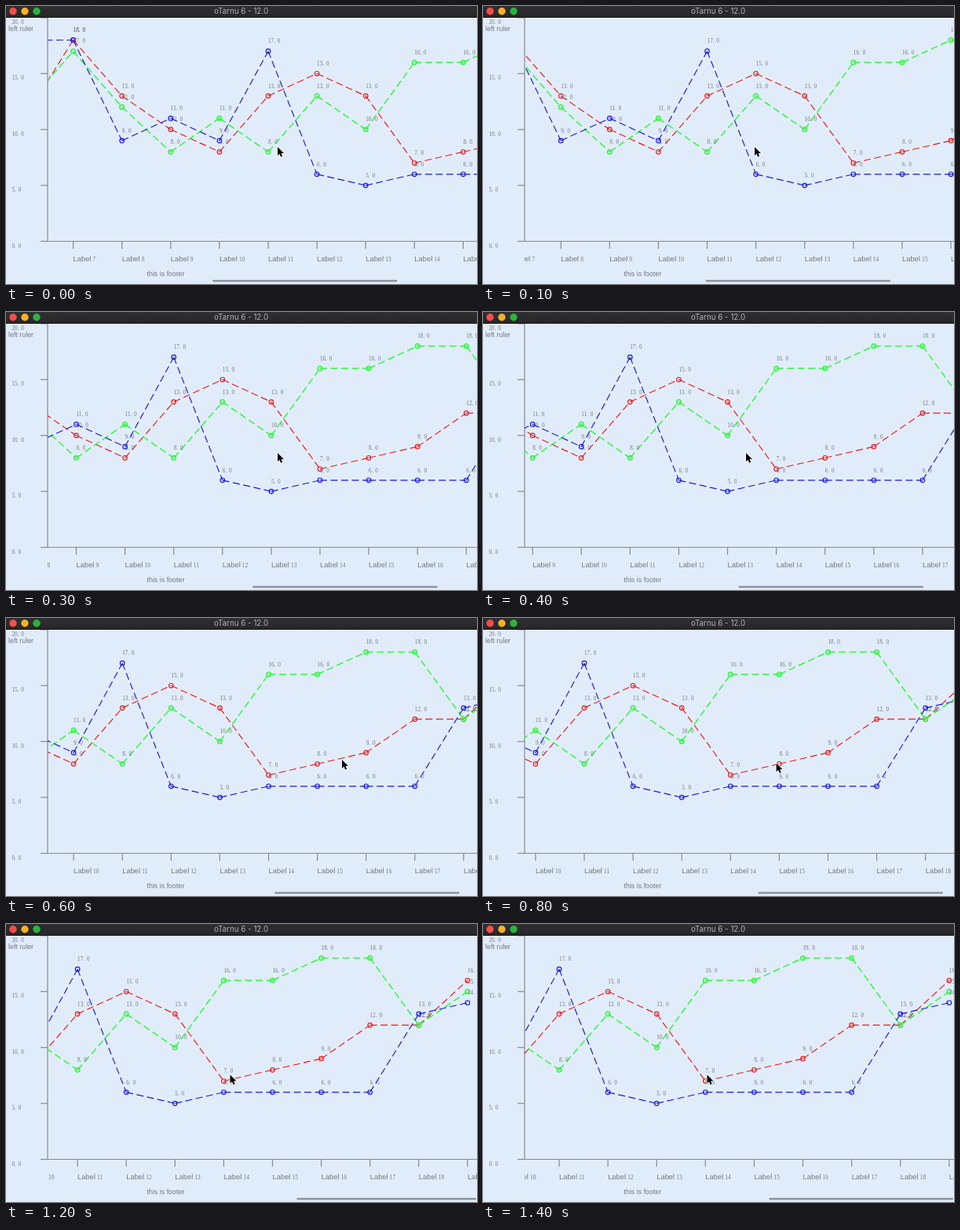
These frames come from a looping animation (600x355 px, 1500 ms). An HTML page with a canvas:

```html
<!DOCTYPE html>
<html lang="en">
<head>
<meta charset="utf-8">
<title>Line chart</title>
<style>
  html, body { margin: 0; width: 100%; height: 100%; overflow: hidden; background: #e1ecfa; }
  canvas { display: block; }
</style>
</head>
<body>
<canvas id="stage" width="600" height="355"></canvas>
<script>
const ctx = document.getElementById('stage').getContext('2d');
const SANS = '"Liberation Sans", Arial, sans-serif';
const SERIF = '"Liberation Serif", Times, serif';
const INK = '#74797f', RULE = '#858a91';
const LEFT = 53, TOP = 15, BASE = 300.5, UNIT = 14.28, STEP = 62.1;
const FIRST = 6, LAST = 19, REST = 98;
const arrow = new Path2D('M0 0V11L2.5 8.7 4.2 12.7 6.2 11.8 4.5 7.9H8Z');

// Plotted values, one per label from FIRST to LAST
const series = [
  { color: '#e8181c', width: 1.15, values: [11, 18, 13, 10, 8, 13, 15, 13, 7, 8, 9, 12, 12, 16] },
  { color: '#35f545', width: 1.5, values: [12, 17, 12, 8, 11, 8, 13, 10, 16, 16, 18, 18, 12, 15] },
  { color: '#1818dc', width: 1.15, values: [18, 18, 9, 11, 9, 17, 6, 5, 6, 6, 6, 6, 13, 14] }
];

const yOf = value => BASE - UNIT * value;

// x of "Label 11": coasting, then a drag past the end, then the bounce back
function scrollAt(tick) {
  if (tick < 8) return 70 + 264 * Math.pow(2 / 3, tick / 2);
  if (tick <= 10) return 129 - 27.5 * (tick - 8);
  const s = 1.25 * (tick - 10);
  return REST - 24 * (1 + s) * Math.exp(-s);
}

// Rests, moves right to the grab point, then drags left
function pointerAt(tick) {
  if (tick < 4) return [346, 180];
  if (tick < 6) return [335 + 46 * (tick - 4), 180];
  const drag = Math.min(1, (tick - 6) / 4.8) ** 1.1;
  return [428 - 142.5 * drag, 181 + 11.5 * drag];
}

function text(str, x, y, size, family = SANS, color = INK) {
  ctx.font = `${size}px ${family}`;
  ctx.fillStyle = color;
  ctx.fillText(str, x, y);
}

function number(value, x, y) {
  ctx.wordSpacing = '1px';
  text(value + '. 0', x, y, 7.2, SERIF);
  ctx.wordSpacing = '0px';
}

function line(x0, y0, x1, y1, color, width) {
  ctx.strokeStyle = color;
  ctx.lineWidth = width;
  ctx.beginPath();
  ctx.moveTo(x0, y0);
  ctx.lineTo(x1, y1);
  ctx.stroke();
}

function circle(x, y, r) {
  ctx.beginPath();
  ctx.arc(x, y, r, 0, Math.PI * 2);
}

function drawAxes() {
  line(LEFT, TOP, LEFT, BASE, RULE, 1.2);
  line(LEFT, BASE, 600, BASE, RULE, 1.2);
  for (let v = 0; v <= 20; v += 5) {
    line(44, yOf(v), LEFT, yOf(v), RULE, 1.2);
    number(v, 7.5, yOf(v) + 8);
  }
  text('left ruler', 3, 31.5, 8.9);
  text('this is footer', 179.5, 345, 8.9);
}

function drawSeries({ color, width, values }, xOf) {
  // Each segment starts its own dash pattern
  ctx.setLineDash([9, 4.5]);
  for (let i = 1; i < values.length; i++) {
    line(xOf(i - 1), yOf(values[i - 1]), xOf(i), yOf(values[i]), color, width);
  }
  ctx.setLineDash([]);
  values.forEach((v, i) => {
    circle(xOf(i), yOf(v), 2.8);
    ctx.stroke();
    number(v, xOf(i), yOf(v) - 10.3);
  });
}

function drawPlot(scroll) {
  const xOf = i => scroll + (i + FIRST - 11) * STEP;
  ctx.save();
  ctx.beginPath();
  ctx.rect(LEFT, TOP, 600 - LEFT, 340);
  ctx.clip();
  for (let i = 0; i <= LAST - FIRST; i++) {
    line(xOf(i), BASE, xOf(i), BASE + 9.5, RULE, 1.2);
    text('Label', xOf(i), 326.3, 9.4);
    text(i + FIRST, xOf(i) + 25, 326.3, 7.5, SERIF);
  }
  series.forEach(s => drawSeries(s, xOf));
  ctx.restore();
}

function drawScrollbar(scroll) {
  const over = Math.max(0, REST - scroll);
  const start = 263 + 0.426 * (333.9 - Math.max(scroll, REST)) + over;
  ctx.fillStyle = '#8d939c';
  ctx.beginPath();
  ctx.roundRect(start, 349.8, 235.5 - over, 2.5, 1.25);
  ctx.fill();
}

function drawTitleBar() {
  const shade = ctx.createLinearGradient(0, 0, 0, TOP);
  shade.addColorStop(0, '#303033');
  shade.addColorStop(1, '#262629');
  ctx.fillStyle = shade;
  ctx.fillRect(0, 0, 600, TOP);
  ctx.fillStyle = '#151517';
  ctx.fillRect(0, TOP - 1, 600, 1);
  ['#fb4c46', '#f9b126', '#2bb53c'].forEach((color, i) => {
    ctx.fillStyle = color;
    circle(9 + 15 * i, 6.8, 4.7);
    ctx.fill();
  });
  ctx.textAlign = 'center';
  text('oTarnu 6 - 12.0', 299.5, 10.4, 9.8, 'Inter, sans-serif', '#b2b2b4');
  ctx.textAlign = 'left';
}

function drawPointer(x, y) {
  ctx.save();
  ctx.translate(x, y);
  ctx.strokeStyle = '#fff';
  ctx.lineWidth = 1.4;
  ctx.stroke(arrow);
  ctx.fillStyle = '#000';
  ctx.fill(arrow);
  ctx.restore();
}

function draw() {
  const tick = Math.floor(performance.now() % 1500 / 100);
  const scroll = scrollAt(tick);
  ctx.fillStyle = '#e1ecfa';
  ctx.fillRect(0, 0, 600, 355);
  drawAxes();
  drawPlot(scroll);
  drawScrollbar(scroll);
  drawTitleBar();
  drawPointer(...pointerAt(tick));
  requestAnimationFrame(draw);
}
draw();
</script>
</body>
</html>
```
